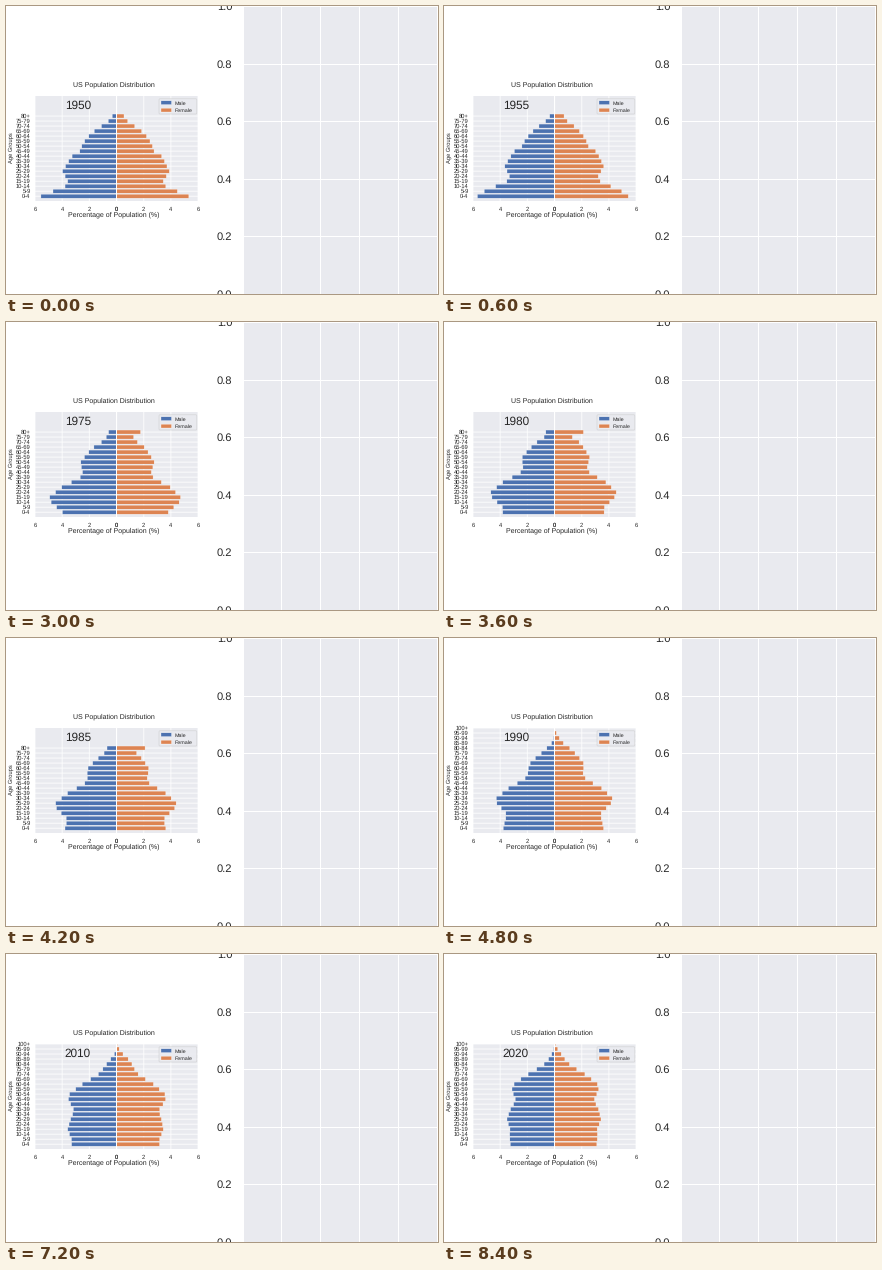
Recreate the animation shown at these times as a matplotlib script. Size 432x288 px, loop 9000 ms.

```python
import numpy as np
import matplotlib.pyplot as plt
from matplotlib.animation import FuncAnimation
from matplotlib.patches import FancyBboxPatch, Rectangle

W, H = 432, 288
PANEL, INK, BLUE, ORANGE = "#E9EAEF", "#262626", "#4C72B0", "#DD8452"
plt.rcParams.update({
    "font.family": "Liberation Sans", "text.color": INK, "text.hinting": "none",
    "axes.facecolor": PANEL, "axes.edgecolor": "none",
    "axes.axisbelow": True, "axes.grid": True,
    "grid.color": "white", "grid.linestyle": "-",
    "xtick.color": INK, "ytick.color": INK,
})

YEARS = range(1950, 2021, 5)
GROUPS = 21
# Boys born per five-year cohort, in millions.
BIRTH_YEARS = [1875, 1885, 1905, 1910, 1925, 1935, 1940, 1950,
               1960, 1965, 1975, 1980, 1995, 2005, 2020]
BIRTHS = [4.2, 4.6, 4.65, 5.45, 6.35, 5.7, 6.0, 8.8,
          10.55, 10.35, 8.75, 8.85, 10.1, 9.8, 10.75]


def group_count(year):
    return 17 if year < 1990 else GROUPS


def pyramid(year):
    """Male and female shares (%) per age group, each cohort ageing over time."""
    age = np.arange(GROUPS)
    born = year - 5 * age
    population = 158 + 2.47 * (year - 1950)
    migration = 1 + 0.0006 * np.clip(born - 1945, 0, None) * np.minimum(age, 7)
    hazard = 0.45 * np.exp(0.4 * (age - 14) - 0.0145 * (born - 1930))
    male = np.interp(born, BIRTH_YEARS, BIRTHS) * migration * np.exp(-hazard)
    male *= 100 / population
    # women start fewer but outlive men, most clearly around 1980
    advantage = np.interp(year, [1950, 1980, 2020], [0.2, 0.55, 0.4])
    female = male * np.interp(age, [3, 8], [0.957, 1.005]) * np.exp(advantage * hazard)
    last = group_count(year) - 1
    return [np.append(s[:last], s[last:].sum()) for s in (male, female)]


def group_names(n):
    return [f"{5 * i}-{5 * i + 4}" for i in range(n - 1)] + [f"{5 * (n - 1)}+"]


fig = plt.figure(figsize=(W / 72, H / 72), dpi=72, facecolor="white")


def panel(x, y, w, h, size, **grid):
    ax = fig.add_axes([x / W, 1 - (y + h) / H, w / W, h / H])
    ax.tick_params(length=0, labelsize=size)
    ax.grid(True, **grid)
    return ax


def label(x, y, text, size, **kw):
    return fig.text(x / W, 1 - y / H, text, fontsize=size, **kw)


def pyramid_side(x, w, xlim, color):
    ax = panel(x, 90, w, 105, 5.7, linewidth=0.8, snap=False)
    ax.set(xlim=xlim, ylim=(-0.956, 20), xticks=[0, 2, 4, 6])
    ax.tick_params(axis="x", pad=5.2)
    ax.tick_params(axis="y", pad=4.4)
    bars = ax.barh(range(GROUPS), np.zeros(GROUPS), height=0.8, color=color,
                   edgecolor="white", linewidth=0.3, snap=False)
    return ax, bars


left, male_bars = pyramid_side(29, 81.4, (6, 0), BLUE)
right, female_bars = pyramid_side(110.7, 81.3, (0, 6), ORANGE)

empty = panel(236.6, 0, 195.4, 288, 11.1, linewidth=1)
empty.set(xlim=(0, 195.4 / 194), ylim=(0, 1))
empty.set_xticks(np.linspace(0, 1, 6), [""] * 6)
empty.set_yticks(np.linspace(0, 1, 6))
empty.tick_params(axis="y", pad=10.3)

label(108, 78.3, "US Population Distribution", 7.03, ha="center", va="center")
label(108, 208.8, "Percentage of Population (%)", 7.03, ha="center", va="center")
label(5.6, 142, "Age Groups", 5.8, ha="center", va="center", rotation=90)
year_text = label(58.8, 102.7, "", 11.8, zorder=6)

# legend, in stage pixels
key = fig.add_axes([0, 0, 1, 1], zorder=5)
key.set(xlim=(0, W), ylim=(H, 0))
key.axis("off")
key.add_patch(FancyBboxPatch((153, 92.8), 37.8, 15.2, facecolor=PANEL, alpha=0.8,
                             boxstyle="round,pad=0,rounding_size=1",
                             edgecolor="#CCCCCC", linewidth=0.6))
for y, name, color in ((96.7, "Male", BLUE), (104.1, "Female", ORANGE)):
    key.add_patch(Rectangle((155, y - 1.9), 10.5, 3.8, facecolor=color,
                            edgecolor="white", linewidth=0.3, snap=False))
    key.text(169, y + 1.9, name, fontsize=5.4)


def draw(step):
    year = YEARS[step]
    n = group_count(year)
    for bars, shares in zip((male_bars, female_bars), pyramid(year)):
        for i, bar in enumerate(bars):
            bar.set_visible(i < n)
            bar.set_width(shares[i] if i < n else 0)
    left.set_yticks(range(n), group_names(n))
    right.set_yticks(range(n), [""] * n)
    year_text.set_text(str(year))
    return []


anim = FuncAnimation(fig, draw, frames=len(YEARS), interval=600,
                     repeat=True, repeat_delay=0, blit=False)
plt.show()
```
